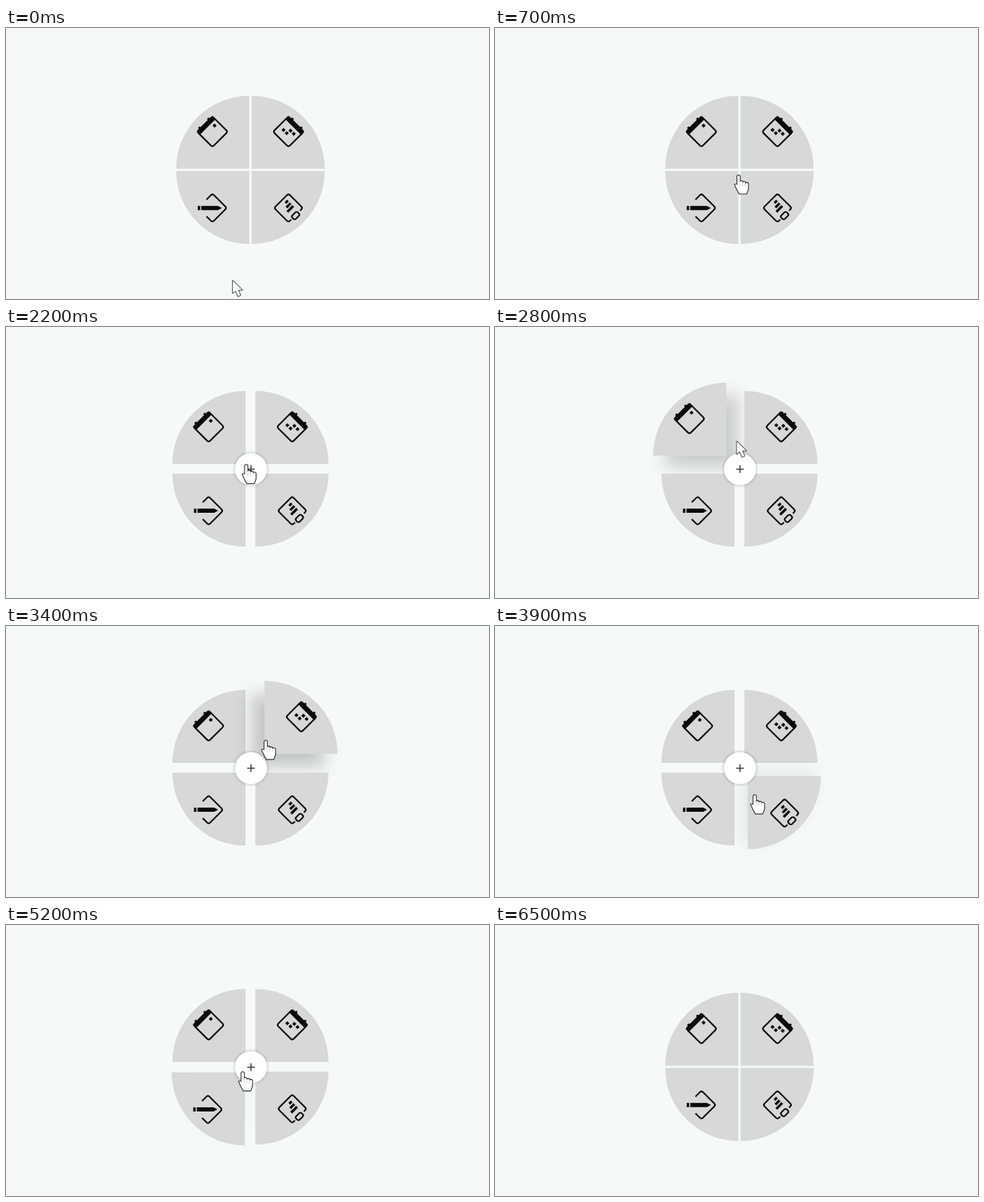
Animation of 690x388 px, one loop 7000 ms. Source, as an HTML page with a canvas:

```html
<!DOCTYPE html>
<html lang="en">
<head>
<meta charset="utf-8">
<title>Radial menu</title>
<style>
  html, body { margin: 0; width: 100%; height: 100%; overflow: hidden; background: #f7f9f9; }
  canvas { display: block; }
</style>
</head>
<body>
<canvas width="690" height="388"></canvas>
<script>
const ctx = document.querySelector('canvas').getContext('2d');
const LOOP = 7000, STEP = 100;
const CENTER = { x: 349.2, y: 203.1 };
const RADIUS = 104.5, CLOSED = 1.6, OPEN = 7, LIFT = 13;
const RISE = 265, FALL = 235, HUB_RADIUS = 23;

const clamp = v => Math.max(0, Math.min(1, v));
const lerp = (a, b, p) => a + (b - a) * p;
const smooth = p => p * p * (3 - 2 * p);
const easeOut = p => 1 - Math.pow(1 - p, 1.6);
const ramp = (t, start, duration, ease) => ease(clamp((t - start) / duration));

// sx, sy: direction from the centre; enter, leave: start of lifting and of falling back
const slices = [
  { sx: -1, sy: -1, enter: 2230, leave: 2755, draw: dayIcon },
  { sx: 1, sy: -1, enter: 2960, leave: 3565, draw: monthIcon },
  { sx: -1, sy: 1, enter: 4310, leave: 5005, draw: editIcon },
  { sx: 1, sy: 1, enter: 3790, leave: 4230, draw: boardIcon }
];
const [day, month, edit, board] = slices;

const stop = (arrive, depart, x, y) => ({ arrive, depart, x, y });
const hubStop = (arrive, depart) => stop(arrive, depart, 343, 197);
const visit = (slice, arrive, depart) =>
  stop(arrive, depart, CENTER.x + slice.sx * 22, CENTER.y + slice.sy * 39);

const route = [
  stop(0, 0, 324, 362),
  stop(400, 400, 376, 285),
  hubStop(800, 1900),
  stop(2000, 2100, 349, 209),
  visit(day, 2400, 2640),
  visit(month, 3000, 3400),
  visit(board, 3750, 4150),
  visit(edit, 4420, 4850),
  hubStop(5400, 6200),
  stop(6400, 6400, 375, 262)
];

function pointerAt(t) {
  const i = route.findIndex(s => t <= s.depart);
  if (i < 0) return null;
  const to = route[i], from = route[i - 1] || to;
  const p = t >= to.arrive ? 1 : ramp(t, from.depart, to.arrive - from.depart, smooth);
  return { x: lerp(from.x, to.x, p), y: lerp(from.y, to.y, p) };
}

function line(x0, y0, x1, y1) {
  ctx.beginPath();
  ctx.moveTo(x0, y0);
  ctx.lineTo(x1, y1);
  ctx.stroke();
}

function roundedBox(x, y, w, h, r) {
  ctx.beginPath();
  ctx.roundRect(x, y, w, h, r);
  ctx.stroke();
}

function dot(x, y) {
  ctx.fillRect(x - 2.1, y - 2.1, 4.2, 4.2);
}

// Three sides of a square, the fourth (right) side open around its middle or corner
function openSquare(half, startX, startY, corners, endX, endY) {
  ctx.beginPath();
  ctx.moveTo(startX, startY);
  corners.forEach(([sx, sy], i) => {
    const [nx, ny] = corners[i + 1] || [0, 0];
    const next = corners[i + 1] ? [nx * half, ny * half] : [endX, endY];
    ctx.arcTo(sx * half, sy * half, ...next, 3);
  });
  ctx.lineTo(endX, endY);
  ctx.stroke();
}

function calendar(sx) {
  ctx.rotate(sx * Math.PI / 4);
  roundedBox(-15.5, -15.5, 31, 31, 3);
  ctx.fillRect(-16, -16, 32, 6.5);
  for (const x of [-9, 9]) ctx.fillRect(x - 1.6, -18.5, 3.2, 4);
}

function dayIcon() {
  calendar(-1);
  dot(8.3, -4);
}

function monthIcon() {
  calendar(1);
  for (const row of [0, 1])
    for (const col of [0, 1]) dot(1 + col * 6.5 - row * 7.7, -3.2 + row * 6.4);
}

function editIcon() {
  ctx.save();
  ctx.rotate(Math.PI / 4);
  openSquare(14.5, -14.5, -2.5, [[-1, -1], [1, -1], [1, 1]], 2.5, 14.5);
  ctx.restore();
  ctx.fillRect(-21, -3, 3.5, 6);
  ctx.beginPath();
  ctx.rect(-16, -3, 24, 6);
  ctx.moveTo(8, -3);
  ctx.lineTo(13.5, 0);
  ctx.lineTo(8, 3);
  ctx.fill();
}

function boardIcon() {
  ctx.rotate(Math.PI / 4);
  openSquare(14.5, 14.5, -9, [[1, -1], [-1, -1], [-1, 1], [1, 1]], 14.5, 9);
  roundedBox(11.5, -5, 7, 11, 2.5);
  ctx.lineWidth = 3.6;
  for (const i of [0, 1, 2]) line(-8 + i * 5.4, -7, -8 + i * 5.4, -2 + i * 3.5);
}

function drawSlice({ sx, sy, hover, offset, draw }) {
  ctx.save();
  ctx.translate(CENTER.x + sx * offset, CENTER.y + sy * offset);
  ctx.save();
  ctx.shadowColor = `rgba(0, 0, 0, ${0.21 * hover})`;
  ctx.shadowBlur = 24;
  ctx.shadowOffsetX = -sx * 18 * hover;
  ctx.shadowOffsetY = -sy * 18 * hover;
  ctx.fillStyle = '#d8d8d8';
  const start = Math.atan2(sy, sx) - Math.PI / 4;
  ctx.beginPath();
  ctx.moveTo(0, 0);
  ctx.arc(0, 0, RADIUS, start, start + Math.PI / 2);
  ctx.fill();
  ctx.restore();

  ctx.translate(sx * 52.7, sy * 53);
  ctx.fillStyle = ctx.strokeStyle = '#0a0a0a';
  ctx.lineWidth = 2.2;
  draw();
  ctx.restore();
}

function drawHub(open) {
  if (!open) return;
  ctx.save();
  ctx.translate(350, 203.6);
  ctx.globalAlpha = clamp(open * 1.5);
  ctx.shadowColor = 'rgba(0, 0, 0, .3)';
  ctx.shadowBlur = 4;
  ctx.fillStyle = '#fff';
  ctx.beginPath();
  ctx.arc(0, 0, HUB_RADIUS, 0, Math.PI * 2);
  ctx.fill();
  ctx.shadowColor = 'transparent';
  ctx.strokeStyle = '#333';
  ctx.lineWidth = 1.5;
  line(-5.5, 0, 5.5, 0);
  line(0, -5.5, 0, 5.5);
  ctx.restore();
}

function overControl(p, open) {
  const dx = p.x - CENTER.x, dy = p.y - CENTER.y;
  if (open && Math.hypot(dx, dy) < HUB_RADIUS) return true;
  return slices.some(({ sx, sy, offset }) => {
    const x = dx * sx - offset, y = dy * sy - offset;
    return x > -5 && y > -5 && Math.hypot(x, y) < RADIUS;
  });
}

const arrowShape = new Path2D('M0 0V17.5L4 14L7.6 22L10.8 20.5L7.4 13H13.2Z');
const handShape = new Path2D('M-5.5 13.5L-3 13L-1 16H13L13.4 20L11 26.5H1L-2 21Z');
for (let i = 0; i < 4; i++) {
  const top = i ? 7 + i * 1.3 : 0;
  handShape.roundRect(-2 + i * 3.9, top, 3.7, 20 - top, 1.8);
}

function drawPointer(p, hand) {
  const shape = hand ? handShape : arrowShape;
  ctx.save();
  ctx.translate(p.x, p.y);
  ctx.lineJoin = 'round';
  ctx.lineWidth = 2.2;
  ctx.strokeStyle = hand ? '#2a2a2a' : '#555';
  ctx.fillStyle = '#fff';
  ctx.stroke(shape);
  ctx.fill(shape);
  ctx.restore();
}

function render(t) {
  const open = ramp(t, 1300, 400, easeOut) - ramp(t, 5600, 400, easeOut);
  ctx.fillStyle = '#f7f9f9';
  ctx.fillRect(0, 0, 690, 388);
  for (const slice of slices) {
    slice.hover = ramp(t, slice.enter, RISE, smooth) - ramp(t, slice.leave, FALL, smooth);
    slice.offset = lerp(CLOSED, OPEN, open) + LIFT * slice.hover;
    drawSlice(slice);
  }
  drawHub(open);
  const pointer = pointerAt(t);
  if (pointer) drawPointer(pointer, overControl(pointer, open));
}

const began = performance.now();
function tick() {
  const t = (performance.now() - began) % LOOP;
  render(Math.floor(t / STEP) * STEP);
  requestAnimationFrame(tick);
}
tick();
</script>
</body>
</html>
```
